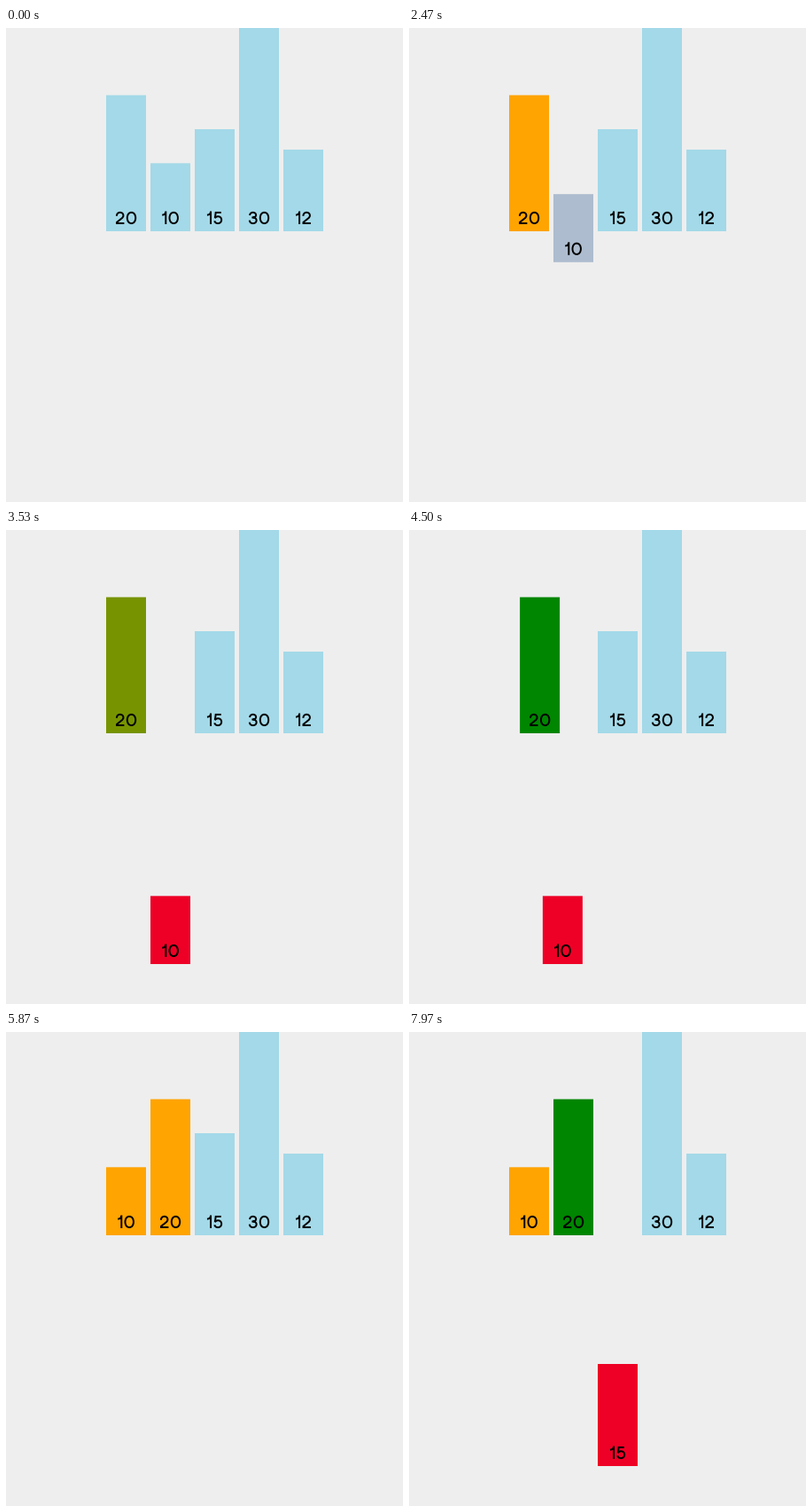
A matplotlib script that plays this animation: 448x534 px, repeating every 8 s.

```python
import numpy as np
import matplotlib.pyplot as plt
from matplotlib.animation import FuncAnimation
from matplotlib.colors import to_rgb
from matplotlib.patches import PathPatch, Rectangle
from matplotlib.path import Path

W, H, DPI = 448, 534, 64
FRAMES, INTERVAL, PHASE = 250, 32, 6

# Bar layout in pixels
LEFT, PITCH, BAR_W = 113, 50, 45
BASE, UNIT, DROP = 229, 23 / 3, 260
VALUES = [20, 10, 15, 30, 12]

BLUE, ORANGE, RED, GREEN = "#a3d9e8", "#ffa400", "#ee0026", "#008600"

# One insertion-sort step per second, each eased over DURATION
FIRST, STEP, DURATION = 1433, 1000, 300
STEPS = [
    {0: dict(color=ORANGE)},
    {1: dict(color=RED, drop=1)},
    {0: dict(color=GREEN)},
    {0: dict(slot=1), 1: dict(slot=0)},
    {0: dict(color=ORANGE), 1: dict(color=ORANGE, drop=0)},
    {2: dict(color=RED, drop=1)},
    {0: dict(color=GREEN)},
]


def oval(cx, cy, rx, ry, k=0.6):
    """Closed loop of four cubic curves."""
    points = [(0, 1)]
    for x, y in [(0, 1), (1, 0), (0, -1), (-1, 0)]:
        nx, ny = y, -x
        points += [(x + k * nx, y + k * ny), (nx + k * x, ny + k * y), (nx, ny)]
    return [(cx + rx * px, cy + ry * py) for px, py in points]


# Digit strokes: ink width, path codes, points (y up from the baseline)
GLYPHS = {
    "0": (11.4, "MCCCC", oval(5.7, 7.05, 4.7, 6.15)),
    "1": (5.2, "MCLL", [
        (0.1, 10.4), (2.2, 10.4), (3.7, 11.4), (4.1, 13.6),
        (4.2, 13.6), (4.2, 0)]),
    "2": (9.8, "MCCCLL", [
        (1.1, 9.2), (1.1, 11.6), (2.6, 13.2), (4.9, 13.2),
        (7.1, 13.2), (8.6, 11.8), (8.6, 9.8),
        (8.6, 7), (6, 6.2), (1.2, 2.1),
        (1.2, 1), (9.6, 1)]),
    "3": (9.8, "MCCCMCCC", [
        (1.2, 10), (1.5, 12), (2.9, 13.2), (4.8, 13.2),
        (6.9, 13.2), (8.3, 12), (8.3, 10.3),
        (8.3, 8.5), (6.9, 7.5), (3.6, 7.5),
        (4.8, 7.5), (7.3, 7.5), (8.8, 6.2), (8.8, 4.3),
        (8.8, 2.2), (7.2, 0.9), (4.9, 0.9),
        (2.7, 0.9), (1.2, 2.2), (1, 4.4)]),
    "5": (9.9, "MLLCCCC", [
        (8.5, 13.1), (2.4, 13.1), (1.6, 6.9),
        (2.4, 8.1), (3.6, 8.7), (5, 8.7),
        (7.4, 8.7), (8.9, 7.1), (8.9, 4.9),
        (8.9, 2.5), (7.3, 0.9), (4.9, 0.9),
        (2.9, 0.9), (1.5, 1.9), (1.1, 3.7)]),
}
GAP = 2.2
CODES = {"M": [Path.MOVETO], "L": [Path.LINETO], "C": [Path.CURVE4] * 3}


def label_shape(text):
    """Points and codes of a number, centred on x = 0, baseline at y = 0."""
    points, codes, x = [], [], 0
    for digit in text:
        width, pattern, outline = GLYPHS[digit]
        points += [(x + px, -py) for px, py in outline]
        codes += [code for letter in pattern for code in CODES[letter]]
        x += width + GAP
    return np.array(points) - [(x - GAP) / 2, 0], codes


def ease_table(x1, y1, x2, y2):
    s = np.linspace(0, 1, 400)
    a, b, c = 3 * (1 - s) ** 2 * s, 3 * (1 - s) * s ** 2, s ** 3
    return a * x1 + b * x2 + c, a * y1 + b * y2 + c


EASE = ease_table(0.25, 0.1, 0.25, 1)


def pose(bar, t):
    """Slot, drop (0..1) and colour of a bar at time t."""
    state = dict(slot=bar, drop=0, color=np.array(to_rgb(BLUE)))
    for k, changes in enumerate(STEPS):
        p = np.interp((t - FIRST - k * STEP) / DURATION, *EASE)
        for key, goal in changes.get(bar, {}).items():
            if key == "color":
                goal = np.array(to_rgb(goal))
            state[key] = state[key] + (goal - state[key]) * p
    return state


fig = plt.figure(figsize=(W / DPI, H / DPI), dpi=DPI, facecolor="#eeeeee")
ax = fig.add_axes([0, 0, 1, 1])
ax.set_xlim(0, W)
ax.set_ylim(H, 0)
ax.axis("off")

bars, labels, shapes = [], [], []
for value in VALUES:
    rect = Rectangle((0, 0), BAR_W, value * UNIT, lw=0, snap=False)
    shape = label_shape(str(value))
    label = PathPatch(Path(*shape), fill=False, ec="black", lw=1.95 * 72 / DPI,
                      capstyle="butt", joinstyle="miter", snap=False)
    bars.append(ax.add_patch(rect))
    labels.append(ax.add_patch(label))
    shapes.append(shape)
for label in labels:
    label.set_zorder(2)


def draw(i):
    t = i * INTERVAL + PHASE
    for n, value in enumerate(VALUES):
        state = pose(n, t)
        x = LEFT + PITCH * state["slot"]
        bottom = BASE + DROP * state["drop"]
        bars[n].set_xy((x, bottom - value * UNIT))
        bars[n].set_facecolor(np.clip(state["color"], 0, 1))
        points, codes = shapes[n]
        labels[n].set_path(Path(points + [x + BAR_W / 2, bottom - 8], codes))
    return bars + labels


anim = FuncAnimation(fig, draw, frames=FRAMES, interval=INTERVAL,
                     init_func=lambda: draw(0), repeat=True, repeat_delay=0)
plt.show()
```
